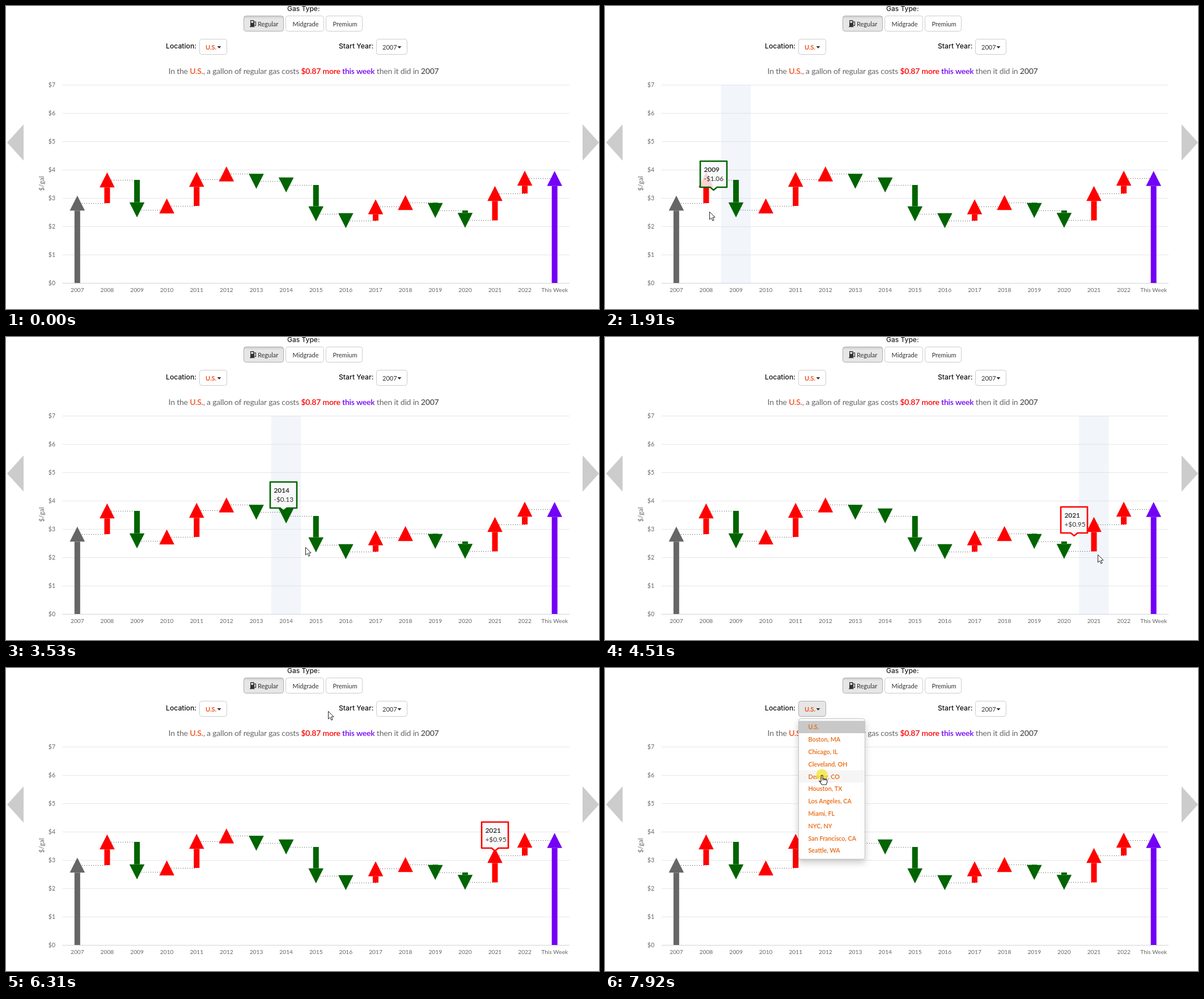
Animation, 1046 px wide and 535 px high, one loop 7990 ms. Source, as an HTML page with a canvas:

```html
<!DOCTYPE html>
<html lang="en">
<head>
<meta charset="utf-8">
<title>Gas prices</title>
<style>
html, body { margin: 0; width: 100%; height: 100%; overflow: hidden; background: #fff; }
canvas { display: block; }
</style>
</head>
<body>
<canvas id="stage" width="1046" height="535"></canvas>
<script>
const ctx = document.getElementById('stage').getContext('2d');
const LOOP = 7990, STEP = 70;
const LEFT = 99.5, RIGHT = 994, BASE = 489, UNIT = 50;
const SANS = 'Lato, "Open Sans", sans-serif';
const HEAD = 'Inter, Roboto, sans-serif';
const RED = '#ff0000', GREEN = '#006400', GRAY = '#666666', PURPLE = '#7300f5', ORANGE = '#f4511e';

const prices = [2.82, 3.64, 2.58, 2.72, 3.66, 3.85, 3.59, 3.46, 2.44, 2.2, 2.69, 2.84, 2.56, 2.21, 3.16, 3.7, 3.69];
const last = prices.length - 1;
const colW = (RIGHT - LEFT) / prices.length;
const colX = i => LEFT + colW * (i + 0.5);
const valY = v => BASE - v * UNIT;
const isTotal = i => i === 0 || i === last;
const colName = i => i === last ? 'This Week' : String(2007 + i);
const colColor = i => i === 0 ? GRAY : i === last ? PURPLE : prices[i] > prices[i - 1] ? RED : GREEN;

const cities = ['U.S.', 'Boston, MA', 'Chicago, IL', 'Cleveland, OH', 'Denver, CO', 'Houston, TX',
  'Los Angeles, CA', 'Miami, FL', 'NYC, NY', 'San Francisco, CA', 'Seattle, WA'];

const ENTER = 390, LEAVE = 5980, HIDE = 6450, PRESS = 6850, OPEN = 7050, PICK = 7920;

// Key points of the mouse (time, x, y) and of the hovered column (time, index)
const path = [[ENTER, 3, 406], [1080, 150, 366], [1280, 150, 366], [1900, 184, 363], [2890, 361, 366],
  [3510, 528, 371], [4490, 869, 384], [5120, 965, 381], [5540, 965, 381], [6310, 568, 76],
  [PRESS, 372, 74], [OPEN, 372, 74], [7460, 382, 188]];
const hovers = [[840, 0], [1768, 1], [1868, 2], [3360, 7], [3540, 8], [4457, 14], [4860, 16], [5600, 16], [5800, 14]];

function along(keys, t) {
  const k = keys.findIndex(p => p[0] > t);
  if (k < 0) return keys[keys.length - 1].slice(1);
  const a = keys[Math.max(0, k - 1)], b = keys[k];
  const f = Math.max(0, (t - a[0]) / (b[0] - a[0] || 1));
  return a.slice(1).map((v, j) => v + (b[j + 1] - v) * f);
}

const hoverAt = t => t < hovers[0][0] ? -1 : Math.floor(along(hovers, t)[0] + 1e-6);

const tipWidth = i => isTotal(i) ? 85 : 49;
const tipTarget = i => [
  Math.min(colX(i) - tipWidth(i) / 2, 1001.5 - tipWidth(i)),
  valY(prices[i]) - (i === last ? 52 : 60),
];

// The tooltip eases toward each hovered column in turn
function tooltipAt(t) {
  const start = hovers[0][0], dt = 10, ease = 1 - Math.exp(-dt / 60);
  let pos = tipTarget(0);
  for (let s = start; s < t; s += dt) {
    const goal = tipTarget(hoverAt(s));
    pos = pos.map((p, j) => p + (goal[j] - p) * ease);
  }
  return pos;
}

function text(str, x, y, size, color, { weight = 400, align = 'left', font = SANS } = {}) {
  ctx.font = `${weight} ${size}px ${font}`;
  ctx.textAlign = align;
  ctx.fillStyle = color;
  ctx.fillText(str, x, y);
}

function poly(points, fill, stroke, width = 1) {
  ctx.beginPath();
  points.forEach(([x, y]) => ctx.lineTo(x, y));
  ctx.closePath();
  ctx.fillStyle = fill;
  ctx.fill();
  if (!stroke) return;
  ctx.strokeStyle = stroke;
  ctx.lineWidth = width;
  ctx.stroke();
}

function rect(x, y, w, h, fill) {
  ctx.fillStyle = fill;
  ctx.fillRect(x, y, w, h);
}

function box(x, y, w, h, fill, stroke) {
  ctx.beginPath();
  ctx.roundRect(x + 0.5, y + 0.5, w, h, 4);
  ctx.fillStyle = fill;
  ctx.fill();
  ctx.strokeStyle = stroke;
  ctx.lineWidth = 1;
  ctx.stroke();
}

function line(x1, y1, x2, y2, color, dash = []) {
  ctx.setLineDash(dash);
  ctx.beginPath();
  ctx.moveTo(x1, y1);
  ctx.lineTo(x2, y2);
  ctx.strokeStyle = color;
  ctx.lineWidth = 1;
  ctx.stroke();
  ctx.setLineDash([]);
}

function column(i, glow) {
  const x = colX(i), y = valY(prices[i]), half = 13.3;
  const from = isTotal(i) ? BASE : valY(prices[i - 1]);
  const dir = y < from ? 1 : -1, neck = y + half * dir;
  const color = colColor(i);
  if ((from - neck) * dir > 0) {
    rect(x - 5, Math.min(from, neck), 10, Math.abs(from - neck), color);
    if (glow) rect(x - 5, neck, 10, from - neck, 'rgba(255,255,255,0.15)');
  }
  poly([[x, y - half * dir], [x + half, neck], [x - half, neck]], color);
}

function chart(hover) {
  for (let v = 0; v <= 7; v++) {
    const y = Math.round(valY(v)) + 0.5;
    line(LEFT, y, RIGHT, y, v ? '#e6e6e6' : '#cfd3da');
    text('$' + v, 87, y + 3.5, 10.5, GRAY, { align: 'right' });
  }
  if (hover >= 0) rect(LEFT + colW * hover, 139, colW, BASE - 139, 'rgba(204,214,235,0.25)');
  for (let i = 0; i < last; i++) {
    const y = Math.floor(valY(prices[i])) + 0.5;
    line(Math.round(colX(i)), y, colX(i + 1), y, '#444', [1, 3]);
  }
  prices.forEach((p, i) => {
    column(i, i === hover && isTotal(i));
    text(colName(i), colX(i), 505, 10.2, GRAY, { align: 'center' });
  });
  ctx.save();
  ctx.translate(67, 313.5);
  ctx.rotate(-Math.PI / 2);
  text('$/gal', 0, 0, 11.5, GRAY, { align: 'center' });
  ctx.restore();
}

function pump(x, y) {
  rect(x + 1, y, 6.5, 11, '#333');
  rect(x, y + 11, 8.5, 1.2, '#333');
  rect(x + 2.2, y + 1.5, 4, 3.2, '#e6e6e6');
  ctx.strokeStyle = '#333';
  ctx.lineWidth = 1.2;
  ctx.strokeRect(x + 7.5, y + 3, 3, 6.5);
}

function button(label, x, y, w, { fill = '#fff', edge = '#ccc', color = '#333', inset = 12.5, weight = 400 } = {}) {
  box(x, y, w, 27, fill, edge);
  text(label, x + inset, y + 18.5, 11, color, { weight });
}

const caret = (x, y) => poly([[x, y], [x + 7, y], [x + 3.5, y + 4]], '#333');

function controls(t) {
  const label = { weight: 500, font: HEAD };
  text('Gas Type:', 496, 9, 12, '#222', label);
  text('Location:', 282, 75, 12.2, '#111', label);
  text('Start Year:', 587, 75, 12.2, '#111', label);

  const pressed = { fill: '#e6e6e6', edge: '#adadad' };
  button('Regular', 419, 17, 70, { ...pressed, inset: 25 });
  const shade = ctx.createLinearGradient(0, 18, 0, 23);
  shade.addColorStop(0, 'rgba(0,0,0,0.1)');
  shade.addColorStop(1, 'rgba(0,0,0,0)');
  rect(420, 18, 69, 5, shade);
  pump(430, 25);
  button('Midgrade', 493, 17, 67);
  button('Premium', 564, 17, 64);

  const focus = t >= OPEN && t < PICK;
  const state = focus ? { fill: '#d4d4d4', edge: '#8c8c8c' } : t >= PRESS - STEP ? pressed : {};
  button('U.S.', 341, 58, 48, { ...state, color: ORANGE, inset: 11, weight: 700 });
  caret(372.5, 71);
  button('2007', 653, 58, 54, { inset: 11 });
  caret(690.5, 71);

  poly([[2, 241], [31, 209], [31, 273]], '#ccc');
  poly([[1046, 241], [1017, 209], [1017, 273]], '#ccc');
}

function headline() {
  const parts = [['In the ', GRAY, 400], ['U.S.', ORANGE, 600], [', a gallon of regular gas costs ', GRAY, 400],
    ['$0.87 more', RED, 600], [' ', GRAY, 400], ['this week', PURPLE, 600], [' then it did in ', GRAY, 400],
    ['2007', '#555', 600]];
  ctx.letterSpacing = '-0.2px';
  const widths = parts.map(([str, , weight]) => {
    ctx.font = `${weight} 14px ${SANS}`;
    return ctx.measureText(str).width;
  });
  let x = 525 - widths.reduce((a, b) => a + b) / 2;
  parts.forEach(([str, color, weight], k) => {
    text(str, x, 120, 14, color, { weight });
    x += widths[k];
  });
  ctx.letterSpacing = '0px';
}

function tooltip(t) {
  const i = hoverAt(t);
  const alpha = Math.min(1, 1 - (t - HIDE) / 200);
  if (i < 0 || alpha <= 0) return;
  const [x, y] = tooltipAt(t).map(Math.round);
  const w = tipWidth(i), l = x + 1, r = x + w - 1, top = y + 1, bottom = y + 47;
  const mid = i === last ? Math.min(colX(i), r - 10) : (l + r) / 2;
  const change = prices[i] - prices[i - 1];
  const note = isTotal(i) ? `$${prices[i].toFixed(2)} per gal`
    : `${change < 0 ? '-' : '+'}$${Math.abs(change).toFixed(2)}`;
  ctx.save();
  ctx.globalAlpha = alpha;
  ctx.lineJoin = 'round';
  poly([[l, top], [r, top], [r, bottom], [mid + 6, bottom], [mid, bottom + 5], [mid - 6, bottom], [l, bottom]],
    'rgba(250,250,250,0.85)', colColor(i), 2.6);
  text(colName(i), x + 7.5, y + 20, 11.8, '#222', { weight: 600 });
  text(note, x + 7.5, y + 36, 11.8, '#333');
  ctx.restore();
}

function menu(t) {
  ctx.save();
  ctx.shadowColor = 'rgba(0,0,0,0.18)';
  ctx.shadowBlur = 12;
  ctx.shadowOffsetY = 6;
  box(341, 89, 117, 248, '#fff', '#c4c4c4');
  ctx.restore();
  const rowH = 21.8, top = 93.3;
  const over = Math.floor((along(path, t)[1] - top) / rowH);
  cities.forEach((city, k) => {
    const y = top + k * rowH;
    if (k === 0) rect(342, y, 116, rowH, '#c8c8c8');
    else if (k === over) rect(342, y, 116, rowH, '#f5f5f5');
    text(city, 358.5, y + 15, 10.8, '#e8650a', { weight: 600 });
  });
}

function arrowCursor() {
  poly([[0, 0], [0, 13.5], [3.2, 10.6], [5.4, 15.6], [7.6, 14.6], [5.4, 9.8], [9.6, 9.6]], '#fff', '#222');
}

function handCursor() {
  poly([[-1, 1], [1.5, 1], [1.5, 7], [9, 9], [9.5, 13], [7.5, 17.5], [0, 17.5], [-4.5, 11], [-1.5, 12]],
    '#fff', '#222', 1.1);
  for (let x = 1.6; x < 7; x += 2.5) line(x, 6.5, x, 10, '#222');
}

function pointer(t) {
  if (t < ENTER) return;
  const [x, y] = along(path, t);
  ctx.save();
  ctx.translate(x + 0.5, y + 0.5);
  if (t >= PICK || (t >= PRESS && t < OPEN)) {
    ctx.beginPath();
    ctx.arc(0, 0, 10, 0, Math.PI * 2);
    ctx.fillStyle = 'rgba(245,230,40,0.75)';
    ctx.fill();
  }
  if (t >= PRESS - STEP) handCursor();
  else arrowCursor();
  ctx.restore();
}

function draw(now) {
  // The screen refreshes every STEP ms
  const t = Math.floor((now % LOOP - 10) / STEP + 0.001) * STEP + 10;
  rect(0, 0, 1046, 535, '#fff');
  chart(t < LEAVE ? hoverAt(t) : -1);
  controls(t);
  headline();
  tooltip(t);
  if (t >= OPEN) menu(t);
  pointer(t);
}

const start = performance.now();
function tick() {
  draw(performance.now() - start);
  requestAnimationFrame(tick);
}
tick();
</script>
</body>
</html>
```
